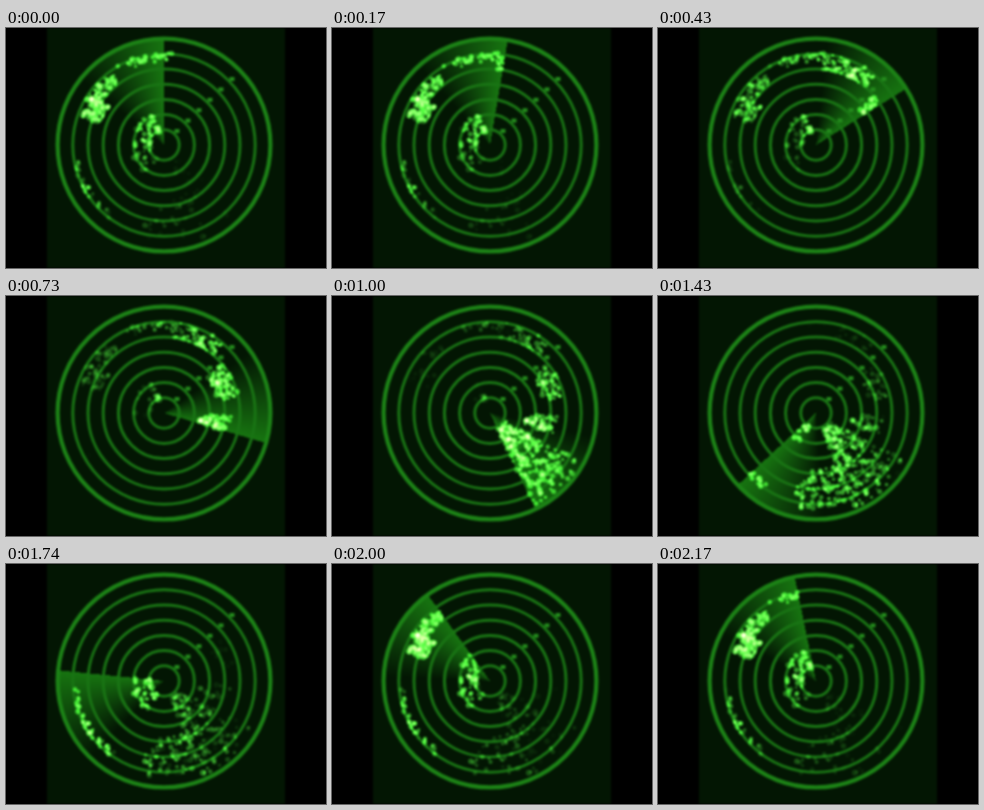
An HTML page with a canvas that plays this animation: 320 px wide and 240 px high, repeating every 2330 ms.

```html
<!DOCTYPE html>
<html lang="en">
<head>
<meta charset="utf-8">
<title>Radar</title>
<style>
  html, body { margin: 0; width: 100%; height: 100%; overflow: hidden; background: #000; }
  canvas { display: block; width: 320px; height: 240px; filter: blur(0.8px); }
</style>
</head>
<body>
<canvas id="radar" width="320" height="240"></canvas>
<script>
const ctx = document.getElementById('radar').getContext('2d');
const CX = 158, CY = 117, RING = 15.2, LOOP = 2330;

// Echo clouds: bearing, radius, half width of each, number of blobs
const CLOUDS = [
  [297, 77, 8, 10, 85],
  [312, 84, 12, 7, 55],
  [347, 88, 18, 5, 28],
  [22, 84, 18, 8, 80],
  [64, 66, 14, 11, 75],
  [100, 52, 8, 16, 55],
  [138, 60, 20, 42, 270],
  [176, 76, 18, 20, 85],
  [240, 89, 25, 3, 42],
  [275, 23, 70, 10, 85]
];

let seed = 41;
const random = () => (seed = seed * 16807 % 2147483647) / 2147483647;
const around = (middle, spread) => middle + spread * (2 * random() - 1);
const radians = bearing => (bearing - 90) * Math.PI / 180;

const echoes = CLOUDS.flatMap(([bearing, radius, width, depth, count]) =>
  Array.from({ length: count }, () => {
    const b = around(bearing, width), r = around(radius, depth);
    return {
      bearing: b,
      x: CX + r * Math.cos(radians(b)),
      y: CY + r * Math.sin(radians(b)),
      size: around(2.1, 0.8),
      life: around(155, 80)
    };
  }));

function circle(x, y, r) {
  ctx.beginPath();
  ctx.arc(x, y, r, 0, 2 * Math.PI);
}

// Seven steps a second, shown on a 30 Hz grid
function sweepAt(t) {
  const tick = Math.floor((t + 5) * 30 / 1000);
  const step = Math.min(15, Math.floor(tick * 7 / 30));
  return Math.max(0, 24.2 * step - 14.6);
}

function drawTrail(sweep) {
  const glow = ctx.createConicGradient(radians(sweep), CX, CY);
  glow.addColorStop(0, 'rgba(28,140,20,0)');
  glow.addColorStop(1 - 52 / 360, 'rgba(28,140,20,0)');
  glow.addColorStop(1, 'rgba(28,140,20,0.8)');
  ctx.fillStyle = glow;
  circle(CX, CY, 7 * RING);
  ctx.fill();
}

function drawRings() {
  for (let i = 1; i <= 7; i++) {
    ctx.strokeStyle = i === 7 ? '#1c8216' : '#197414';
    ctx.lineWidth = i === 7 ? 4.2 : 3;
    circle(CX, CY, i * RING);
    ctx.stroke();
  }
  // Range marks beside the rings on the north-east diagonal
  ctx.fillStyle = '#238a1c';
  for (let i = 0; i < 6; i++) ctx.fillRect(168.5 + 11 * i, 101 - 10.4 * i, 5, 4);
}

// Overlapping blobs add up to bright cores
function drawEchoes(sweep) {
  ctx.globalCompositeOperation = 'lighter';
  for (const { bearing, x, y, size, life } of echoes) {
    const age = (sweep - bearing + 360) % 360;
    if (age > life) continue;
    ctx.fillStyle = `rgba(50,140,38,${Math.min(0.9, 1.5 * (1 - age / life))})`;
    circle(x, y, size);
    ctx.fill();
  }
  ctx.globalCompositeOperation = 'source-over';
}

function draw() {
  const sweep = sweepAt(performance.now() % LOOP);
  ctx.fillStyle = '#000';
  ctx.fillRect(0, 0, 320, 240);
  ctx.fillStyle = '#031603';
  ctx.fillRect(41, 0, 238, 240);
  drawTrail(sweep);
  drawRings();
  drawEchoes(sweep);
  requestAnimationFrame(draw);
}

draw();
</script>
</body>
</html>
```
